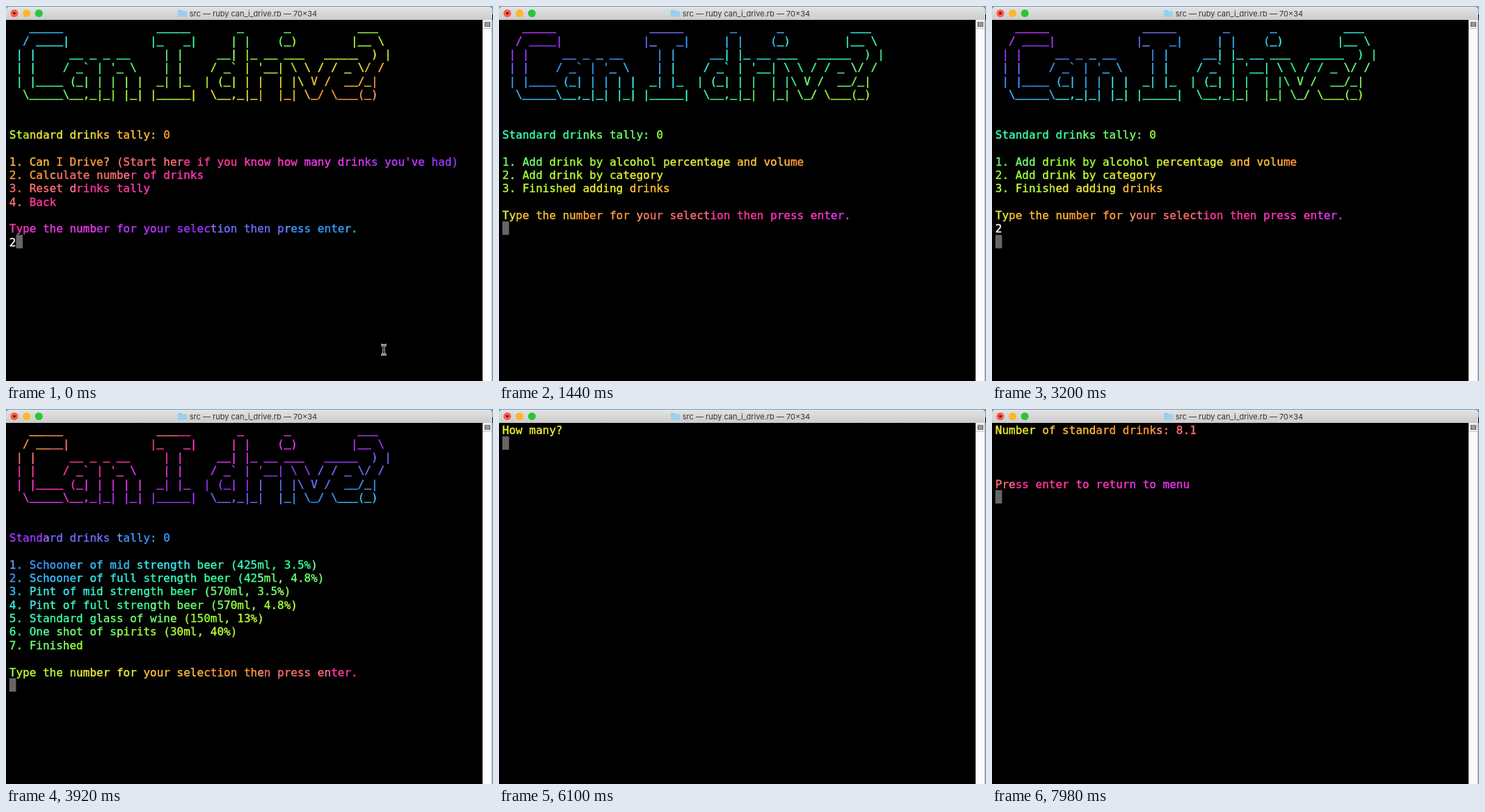
Recreate the animation shown at these times as an HTML page with a canvas. Size 700x540 px, loop 8 s.

```html
<!DOCTYPE html>
<html lang="en">
<head>
<meta charset="utf-8">
<title>Terminal</title>
<style>
html, body { margin: 0; width: 100%; height: 100%; overflow: hidden; background: #000; }
canvas { display: block; width: 700px; height: 540px; }
</style>
</head>
<body>
<canvas id="stage" width="700" height="540"></canvas>
<script>
const ctx = document.getElementById('stage').getContext('2d');
const LOOP = 8000;
const COL = 9.632, ROW = 19.35, LEFT = 4.8, TOP = 20.7;

const banner = String.raw`
   _____              _____       _      _          ___
  / ____|            |_   _|     | |    (_)        |__ \
 | |     __ _ _ __     | |     __| |_ __ ___   _____  ) |
 | |    / _${'`'} | '_ \    | |    / _${'`'} | '__| \ \ / / _ \/ /
 | |____ (_| | | | |  _| |_  | (_| | |  | |\ V /  __/_|
  \_____\__,_|_| |_| |_____|  \__,_|_|  |_| \_/ \___(_)`.split('\n').slice(1);

const menu = (...items) => [
  ...banner, '', '', 'Standard drinks tally: 0', '',
  ...items.map((item, i) => `${i + 1}. ${item}`), '',
  'Type the number for your selection then press enter.'
];

// hue: rainbow phase of the first cell, in degrees; keyAt / enterAt: typing times
const screens = [
  { at: 0, hue: -124, key: '2', keyAt: 0, enterAt: 900, pointer: true, lines: menu(
    "Can I Drive? (Start here if you know how many drinks you've had)",
    'Calculate number of drinks', 'Reset drinks tally', 'Back') },
  { at: 1000, hue: 156, key: '2', keyAt: 2700, enterAt: 3140, lines: menu(
    'Add drink by alcohol percentage and volume',
    'Add drink by category', 'Finished adding drinks') },
  { at: 3300, hue: 50, key: '2', keyAt: 4400, enterAt: 4800, lines: menu(
    'Schooner of mid strength beer (425ml, 3.5%)',
    'Schooner of full strength beer (425ml, 4.8%)',
    'Pint of mid strength beer (570ml, 3.5%)',
    'Pint of full strength beer (570ml, 4.8%)',
    'Standard glass of wine (150ml, 13%)',
    'One shot of spirits (30ml, 40%)', 'Finished') },
  { at: 4920, hue: 21, key: '5', keyAt: 6550, enterAt: 7000, lines: ['How many?'] },
  { at: 7100, hue: 28, key: '', keyAt: LOOP, enterAt: LOOP, lines: [
    'Number of standard drinks: 8.1', '', '', '', 'Press enter to return to menu'] }
];

const LEVELS = [55, 110, 155, 190, 235, 255];

function rainbow(hue, row, col) {
  const angle = hue * Math.PI / 180 + 0.3 * (row + col / 8);
  const channel = k => {
    const value = Math.sin(angle + k * 2 * Math.PI / 3) * 127 + 128;
    return LEVELS[Math.floor(value * 6 / 256)];
  };
  return `rgb(${[0, 1, 2].map(channel)})`;
}

function rect(x, y, w, h, color) {
  ctx.fillStyle = color;
  ctx.fillRect(x, y, w, h);
}

function disc(x, y, r, color) {
  ctx.fillStyle = color;
  ctx.beginPath();
  ctx.arc(x, y, r, 0, 2 * Math.PI);
  ctx.fill();
}

// A hairline outline gives the heavier strokes of smoothed terminal text.
function cell(char, row, col, color) {
  const raise = char === '_' ? 1.6 : 0;
  const x = LEFT + col * COL, y = 36.2 + row * ROW - raise;
  ctx.fillStyle = ctx.strokeStyle = color;
  ctx.lineWidth = char === '_' ? 0.8 : 0.4;
  ctx.fillText(char, x, y);
  ctx.strokeText(char, x, y);
}

function drawWindow() {
  rect(0, 0, 700, 540, '#000');
  rect(0, 0, 700, 12, '#6f9cc0');
  const bar = ctx.createLinearGradient(0, 0, 0, 20);
  bar.addColorStop(0, '#e4e4e4');
  bar.addColorStop(1, '#cccccc');
  ctx.fillStyle = bar;
  ctx.beginPath();
  ctx.roundRect(0, 1, 699, 19, [5, 5, 0, 0]);
  ctx.fill();

  ['#ff5a48', '#ffb62a', '#2bc536'].forEach((color, i) => disc(12 + 17.6 * i, 10.5, 5.5, color));
  disc(12, 10.5, 1.8, '#5a0d00');

  rect(247, 6, 6, 3, '#8cc6ea');
  rect(247, 7.5, 13, 8, '#97d0f2');
  ctx.font = '11px Inter, sans-serif';
  ctx.fillStyle = '#333';
  ctx.fillText('src — ruby can_i_drive.rb — 70×34', 263.8, 14.5);

  rect(685, 20, 13, 520, '#fbfbfb');
  rect(685, 20, 13, 13, '#f0f0f0');
  rect(685, 32, 13, 1, '#cccccc');
  rect(688, 23, 8, 7, '#555');
  for (const y of [24, 26, 28]) rect(689, y, 6, 1, '#d8d8d8');
  rect(698, 20, 2, 520, '#8fa3ba');
}

function drawPointer(x, y) {
  const path = new Path2D(
    `M${x - 4} ${y - 7}q4 0 4 3v8q0 3 -4 3M${x + 4} ${y - 7}q-4 0 -4 3v8q0 3 4 3M${x - 2} ${y + 3}h4`);
  ctx.strokeStyle = '#f4f4f4';
  ctx.lineWidth = 3;
  ctx.stroke(path);
  ctx.strokeStyle = '#111';
  ctx.lineWidth = 1;
  ctx.stroke(path);
}

function draw(time) {
  const screen = screens.findLast(s => s.at <= time);
  drawWindow();

  ctx.font = '16px "DejaVu Sans Mono", monospace';
  screen.lines.forEach((line, row) => {
    [...line].forEach((char, col) => {
      if (char !== ' ') cell(char, row, col, rainbow(screen.hue, row, col));
    });
  });

  const inputRow = screen.lines.length;
  const typed = time >= screen.keyAt, entered = time >= screen.enterAt;
  if (typed) cell(screen.key, inputRow, 0, '#fff');
  const cursorCol = typed && !entered ? 1 : 0;
  const cursorRow = inputRow + (entered ? 1 : 0);
  rect(LEFT + cursorCol * COL, TOP + cursorRow * ROW - 0.7, COL, ROW, '#666');

  if (screen.pointer) drawPointer(543, 495);
}

function frame() {
  draw(performance.now() % LOOP);
  requestAnimationFrame(frame);
}
frame();
</script>
</body>
</html>
```
